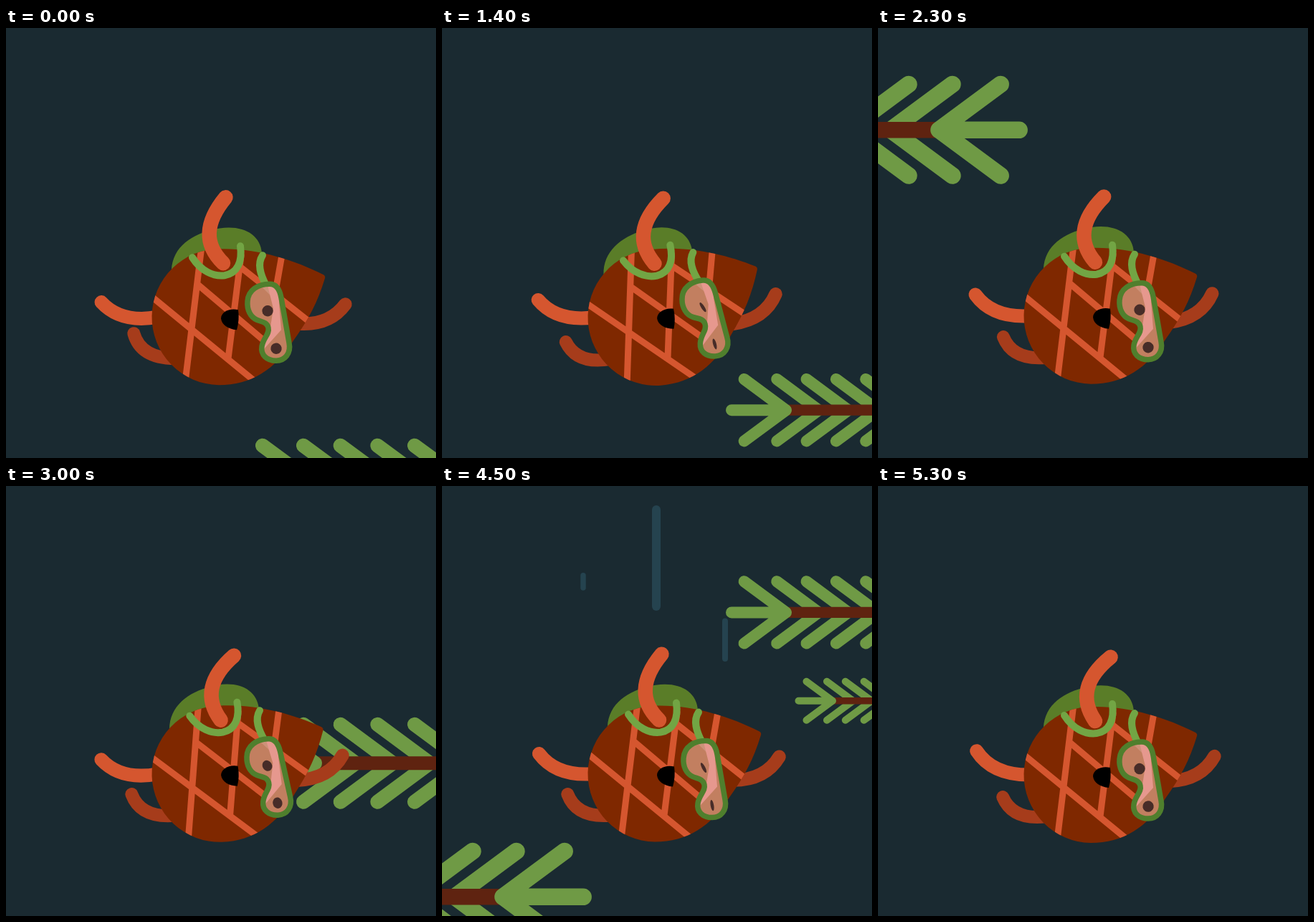
Animation, 600 px wide and 600 px high, one loop 5.4 s. Source, as an HTML page with a canvas:

```html
<!DOCTYPE html>
<html lang="en">
<head>
<meta charset="utf-8">
<title>Skydiving steak</title>
<style>
  html, body { margin: 0; height: 100%; overflow: hidden; background: #1a2a31; }
  canvas { display: block; width: 100vw; height: 100vh; }
</style>
</head>
<body>
<canvas id="stage" width="600" height="600"></canvas>
<script>
const ctx = document.getElementById('stage').getContext('2d');
const CYCLE = 2700, STEP = 100, DEG = Math.PI / 180;
const SKY = '#1a2a31', WIND = '#25434f', LEAF = '#6f9a45', BARK = '#5f2310';
const EMBER = '#d5562f', RUST = '#a63c1b', MEAT = '#7f2800';
const PACK = '#5a7d28', STRAP = '#72a544', RIM = '#4f7f2d';

// Branches enter from the nearer side edge; speed in px/ms
const branches = [
  { x: 431, size: 1, start: -76, speed: .833 },
  { x: 93, size: .61, start: 442, speed: .885 },
  { x: 480, size: .8, start: 1213, speed: .892 },
  { x: 545, size: .5, start: 1340, speed: .87 },
  { x: 85, size: 1.18, start: 1653, speed: .862 }
];

// Each streak grows from low to high, its tail following after lag, twice per cycle
const streaks = [
  { x: 197, width: 7.5, low: 312, high: 121, lag: 200, start: 400, gap: 1002 },
  { x: 299, width: 12, low: 200, high: -40, lag: 175, start: 765, gap: 829 },
  { x: 395, width: 8, low: 245, high: 40, lag: 73, start: 874, gap: 854 }
];

const wrap = t => ((t % CYCLE) + CYCLE) % CYCLE;
const clamp = (v, low, high) => Math.min(high, Math.max(low, v));
const wave = (t, beats, peak) => Math.cos((360 * beats * t / CYCLE - peak) * DEG);

function smooth(from, to, t) {
  const p = clamp((t - from) / (to - from), 0, 1);
  return p * p * (3 - 2 * p);
}

function stroke(path, color, width) {
  ctx.strokeStyle = color;
  ctx.lineWidth = width;
  ctx.stroke(new Path2D(path));
}

function fill(path, color) {
  ctx.fillStyle = color;
  ctx.fill(new Path2D(path));
}

function clipped(path, draw) {
  ctx.save();
  ctx.clip(new Path2D(path));
  draw();
  ctx.restore();
}

function rotated(x, y, angle, draw) {
  ctx.save();
  ctx.translate(x, y);
  ctx.rotate(angle * DEG);
  ctx.translate(-x, -y);
  draw();
  ctx.restore();
}

function drawBranch({ x, size, start, speed }, t) {
  ctx.save();
  ctx.translate(x, 700 - speed * wrap(t - start));
  ctx.scale(x < 300 ? -size : size, size);
  for (let joint = 57; joint < 480; joint += 51.7) {
    stroke(`M${joint - 73} -54L${joint} 0L${joint - 73} 54`, LEAF, 20);
  }
  stroke('M5 0H700', BARK, 19);
  stroke('M-73 -54L0 0L-73 54M-95 0H0', LEAF, 20);
  ctx.restore();
}

function drawStreak({ x, width, low, high, lag, start, gap }, t) {
  const front = age => clamp(low - .84 * age, high, low);
  for (const age of [t - start, t - start - gap]) {
    const top = front(age) + width / 2;
    const bottom = front(age - lag) - width / 2;
    if (bottom > top) stroke(`M${x} ${top}V${bottom}`, WIND, width);
  }
}

function drawLimb(x, y, curve, angle, color, width) {
  rotated(x, y, angle, () => stroke(`M${x} ${y}Q${curve}`, color, width));
}

function drawEye(x, y, angle, open) {
  ctx.fillStyle = '#472c28';
  ctx.beginPath();
  ctx.ellipse(x, y, 7.7 * open, 7.7, angle * DEG, 0, Math.PI * 2);
  ctx.fill();
}

const bodyShape = 'M300 309C350 308 402 324 443 345Q446 347 445 350C435 383 422 408 401 437' +
  'C376 477 342 499 297 499A95 95 0 0 1 300 309Z';
const lensShape = 'M368 358C378 358 382 366 384 377L395 440C398 455 389 465 377 465' +
  'C364 465 355 457 357 445C359 433 368 428 366 419C364 411 357 411 350 408' +
  'C341 404 336 394 337 382C338 366 352 358 368 358Z';

function drawFace(open) {
  fill(lensShape, '#c27f60');
  clipped(lensShape, () => {
    fill('M350 355H380L373 378Z', '#cd9279');
    fill('M364 356H386L381 384L384 422L357 452V437L369 418L373 392Z', '#e6988e');
    fill('M384 470L398 446V470Z', '#a995a8');
  });
  stroke(lensShape, RIM, 7.5);
  drawEye(365, 395.5, -28, open);
  drawEye(377, 448, -10, open);
  fill('M324 394C312 391 300 397 300 406C301 415 310 421 322 422Q326 408 324 394Z', '#000');
}

function drawBody(open) {
  fill(bodyShape, MEAT);
  clipped(bodyShape, () => stroke('M273 305L250 495M328 318L310 462M386 312L374 380' +
    'M200 373L350 496M268 359L360 437M328 335L425 412', EMBER, 9));
  stroke('M260 321C272 340 290 348 305 346C323 343 330 327 327 305' +
    'M358 318C350 330 355 345 363 360', STRAP, 10);
  drawFace(open);
}

function drawCharacter(t) {
  const tilt = -7.4 * smooth(100, 600, t) * (1 - smooth(1150, 1800, t));
  const open = 1 - .7 * smooth(200, 550, t) * (1 - smooth(1800, 2200, t));
  ctx.save();
  ctx.translate(0, 1.2 * wave(t, 11, 290) - 1.2);
  rotated(300, 404, tilt, () =>
    fill('M231 345C229 310 255 291 285 283C325 272 355 286 357 315L300 345Z', PACK));
  drawLimb(236, 462, '188 465 176 431', tilt - 4 * wave(t, 11, 190), RUST, 18);
  drawLimb(212, 404, '160 409 135 377', tilt - 5 * wave(t, 11, 20), EMBER, 19);
  drawLimb(406, 413, '451 412 470 379', tilt + 8 * wave(t, 10, -37), RUST, 18.5);
  rotated(300, 404, tilt, () => {
    drawBody(open);
    // The raised arm keeps its own angle while the shoulder tilts
    drawLimb(303, 329, '267 286 316 238', 6 * wave(t, 12, 175) - tilt, EMBER, 20.5);
  });
  ctx.restore();
}

function render(now) {
  const t = wrap(Math.floor(now / STEP) * STEP);
  ctx.fillStyle = SKY;
  ctx.fillRect(0, 0, 600, 600);
  ctx.lineCap = ctx.lineJoin = 'round';
  streaks.forEach(streak => drawStreak(streak, t));
  branches.forEach(branch => drawBranch(branch, t));
  drawCharacter(t);
}

let origin;
function tick(now) {
  origin ??= now;
  render(now - origin);
  requestAnimationFrame(tick);
}
requestAnimationFrame(tick);
</script>
</body>
</html>
```
